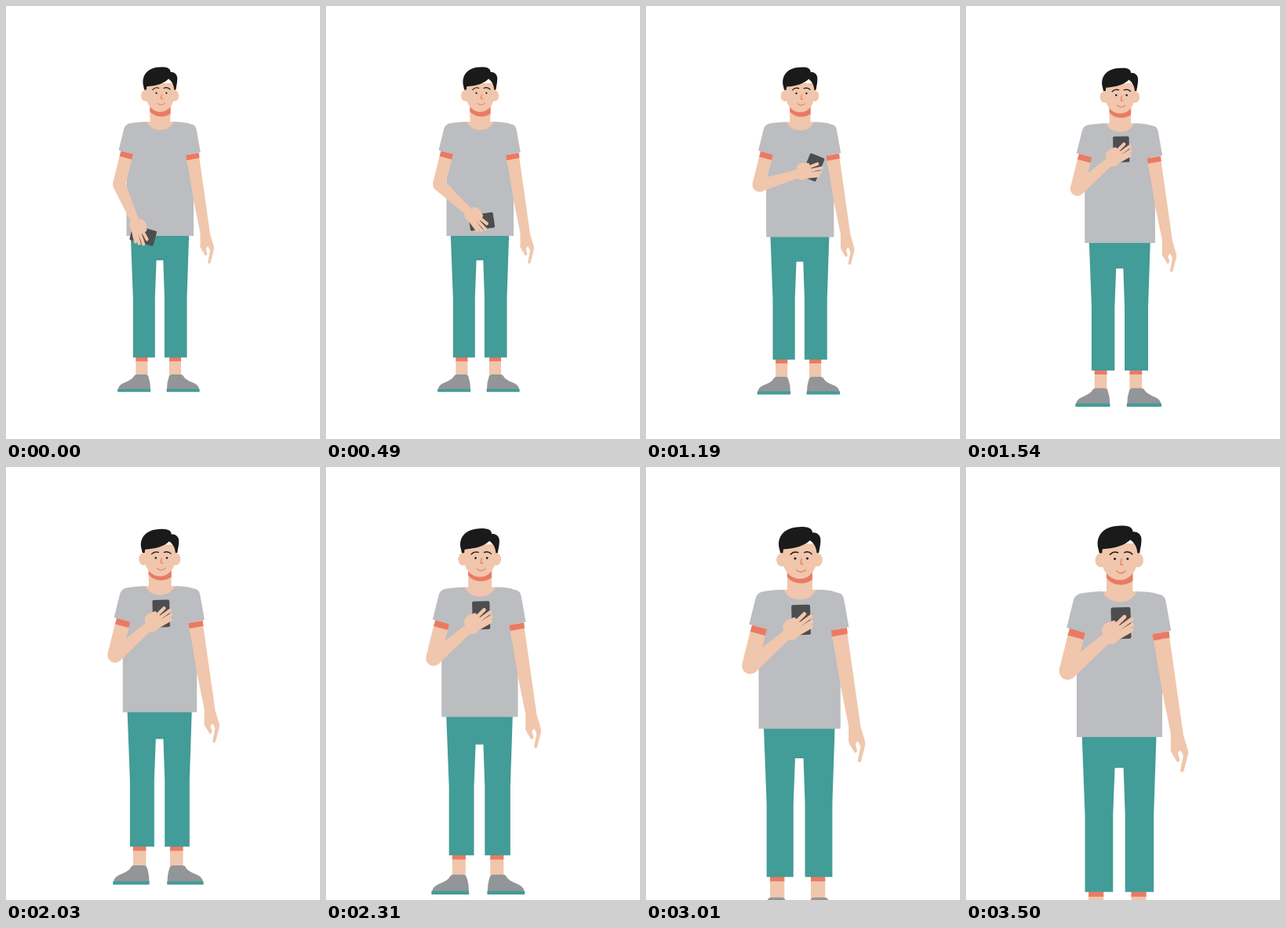
Recreate the animation shown at these times as an HTML page. Size 400 by 550 pixels, loop 4620 ms.

```html
<!DOCTYPE html>
<html lang="en">
<head>
<meta charset="utf-8">
<title>Man raising a phone</title>
<style>
  html, body { margin: 0; width: 100%; height: 100%; overflow: hidden; background: #fff; }
  svg { display: block; width: 400px; height: 550px; }
  .skin { fill: #f0c6ac; }
  .red { fill: #ea7a64; }
  .shirt { fill: #bbbdc0; }
  .teal { fill: #429c97; }
  .shoe { fill: #939598; }
  .black { fill: #1a1a1a; }
  .line { fill: none; stroke-linecap: round; stroke-linejoin: round; }
</style>
</head>
<body>
<svg viewBox="0 0 400 550">
  <g id="man">
    <!-- legs -->
    <path class="skin" d="M165.4 449H180.4V472H165.4ZM208 449H223V472H208Z"/>
    <path class="red" d="M165.4 446H180.4V451.2H165.4ZM208 446H223V451.2H208Z"/>
    <path class="shoe" d="M143 487C143.500 482 147 480 153 477.500C160 474.500 162 472 163 470Q164 468 167 468H177Q180.500 468 181.500 471Q184 478 184 487Z"/>
    <path class="shoe" d="M246 487C245.500 482 242 480 236 477.500C229 474.500 227 472 226 470Q225 468 222 468H212Q208.500 468 207.500 471Q205 478 205 487Z"/>
    <path class="teal" d="M142.200 486.400H184.200V490.300H142.200ZM204.600 486.400H246.600V490.300H204.600Z"/>
    <path class="teal" d="M158.800 291H233.100L230.500 370V446.500H201.900V370L200.300 322.900H191.600L189.800 370V446.500H161.800V370Z"/>

    <!-- neck and shirt -->
    <path class="skin" d="M183.300 115H209.600V150H183.300Z"/>
    <path class="shirt" d="M180 147C172 147 164 148 158 149C153 150 151 153 150 157L143.500 183.200L162 188.500L153.500 215V292H239V235L229 189.500L247.800 186L242.800 158C242 153 240 150.500 235 150Q230 147.300 213.500 147Z"/>
    <path class="skin" d="M179.600 146.700C184 161.200 209 161.200 213.600 146.700Z"/>
    <path fill="#fff" d="M178 140H183.300V147H178ZM209.600 140H215V147H209.600Z"/>

    <!-- hanging arm -->
    <path class="skin" d="M230 193L246 191L260 289.500L264.900 306V309L260.500 326Q259 328 257 326L260 310.500L257.200 305L254.600 308L256.400 314.500Q256 317.500 253.800 317L247.500 306.500V288.500L239 247Z"/>
    <path class="red" d="M229 189.500L245.700 186.600L246.500 193L230.200 196Z"/>

    <!-- raised arm -->
    <path class="skin" d="M145 189L161 193L153.500 222L144.500 235L136.200 224.500Z"/>
    <path class="red" d="M146.500 183.900L162.100 188.300L160.400 195L144.600 190.700Z"/>
    <g id="forearm">
      <circle class="skin" cx="144.500" cy="226.500" r="8.500"/>
      <path class="skin" d="M140 220L158.200 206.600L180.500 189L187 197.500L150 233.200Z"/>
      <rect x="188" y="162.900" width="19.600" height="31.400" rx="1.800" fill="#4d4d4f" transform="rotate(-1.500 197.800 178.500)"/>
      <path class="skin" d="M178.600 187Q178.400 184 180 182Q182 178.500 185 178L191 175.800L197 181.500L197 191L194.500 196Q192 199.500 189 199.500L184.500 199.500Z"/>
      <path class="line" stroke="#f0c6ac" stroke-width="4" d="M187.200 186.200L201.200 172.400M190.400 187.800L208.200 174.900M192 190.900L209 180.400M192 194.800L208.400 185.500"/>
    </g>

    <!-- head -->
    <path class="red" d="M183.300 126V133.500C189 142 203 142.300 209.600 136.500V126Z"/>
    <g class="skin" data-drop="2">
      <ellipse cx="177.500" cy="114" rx="5.500" ry="7"/>
      <ellipse cx="214.700" cy="114" rx="5.500" ry="7"/>
    </g>
    <path class="skin" data-drop="1.200" d="M177 98V108C177.500 125 186 134.500 196.500 134.500C207 134.500 215 125 215.500 108V98Z"/>
    <path id="hair" class="black" d="M176.200 106.500L174.500 99C173.500 90 178 83.500 184 80.500C190 77.500 197 77.300 202 77.700C207 78 209.500 80.500 209.700 84C214 83.500 217 86 218 90C218.800 95 217 102 216.400 106.500H214.200C214 101 211.500 95.500 207 92.500C202 98 192 101.500 179.300 102.300L178.800 106.500Z"/>
    <g data-drop="4">
      <circle class="black" cx="191.600" cy="110.600" r="1.150"/>
      <circle class="black" cx="204.400" cy="110.600" r="1.150"/>
      <path class="line" stroke="#1a1a1a" stroke-width="1.200" d="M186.800 106.300Q190 102.600 194.700 104.300M201.200 104.300Q205.500 102.500 209 105.800"/>
    </g>
    <g class="line" stroke="#ea7a64" stroke-width="1">
      <path data-drop="2.500" d="M198.200 112.300L197.500 118H199.800"/>
      <path data-drop="3" d="M193 123.500Q197.700 128 202.400 123.500"/>
    </g>
  </g>
</svg>
<script>
  const LOOP = 4620, STEP = 70;
  const man = document.getElementById('man');
  const forearm = document.getElementById('forearm');
  const hair = document.getElementById('hair');
  const dropping = [...document.querySelectorAll('[data-drop]')];

  const ramp = (t, from, to) => Math.min(1, Math.max(0, (t - from) / (to - from)));
  const setTransform = (el, value) => el.setAttribute('transform', value);

  function pose(t) {
    const lift = ramp(t, 210, 1470);
    const zoom = 1 + 0.275 * ramp(t, 1120, 3500);
    const nod = ramp(t, 1120, 1820);

    setTransform(forearm, `rotate(${107 * (1 - lift)} 144.5 226.5)`);
    setTransform(man, `translate(199 107) scale(${zoom}) translate(-199 -107)`);
    // The crown sinks further than the hairline as the head bows.
    setTransform(hair, `matrix(1 0 0 ${1 - 0.055 * nod} 0 ${8.26 * nod})`);
    for (const el of dropping) setTransform(el, `translate(0 ${el.dataset.drop * nod})`);
  }

  const start = performance.now();
  function tick() {
    const t = (performance.now() - start) % LOOP;
    pose(Math.floor(t / STEP) * STEP);
    requestAnimationFrame(tick);
  }
  tick();
</script>
</body>
</html>
```
